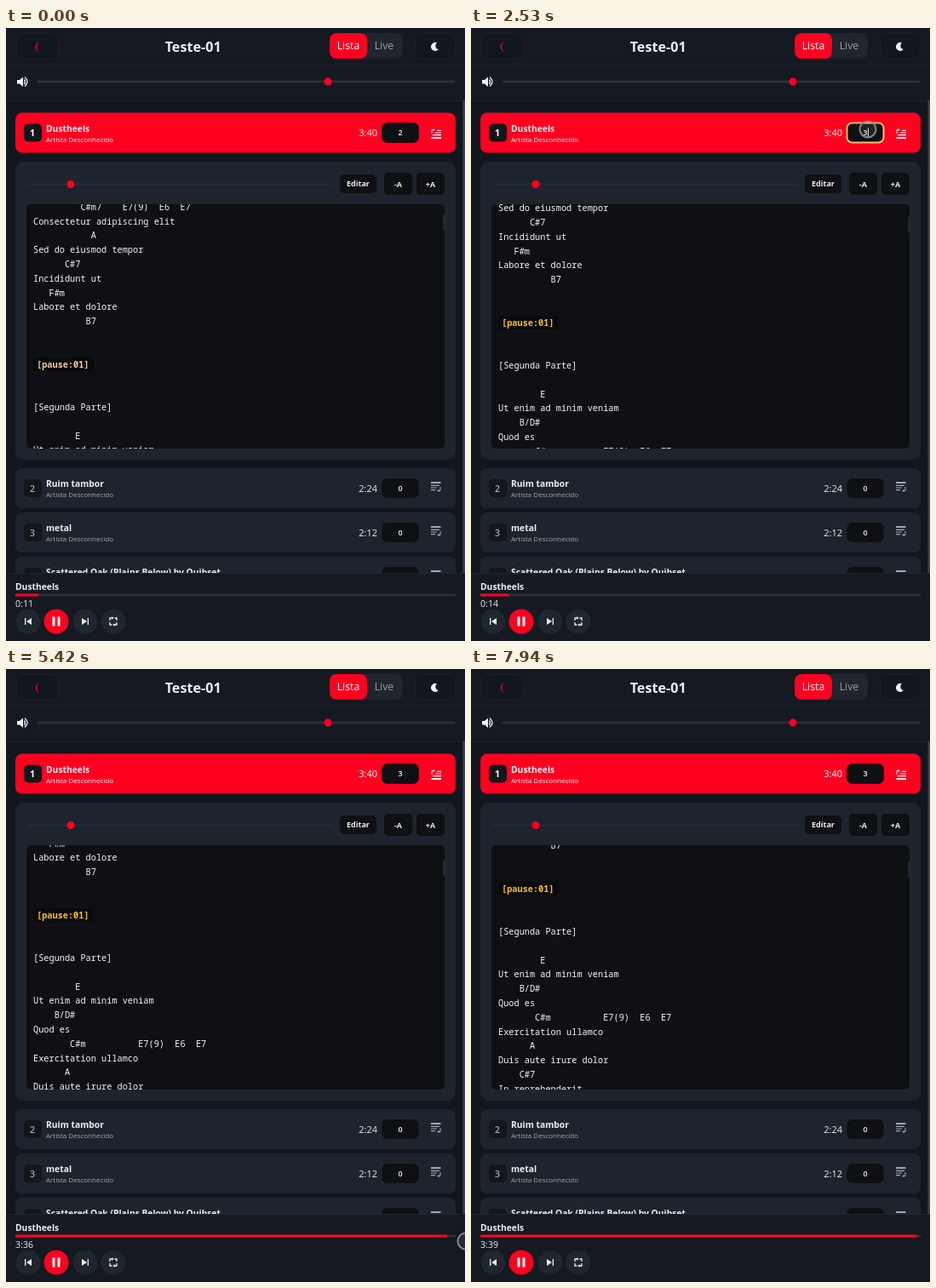
An HTML page that plays this animation: 539x720 px, repeating every 8 s.

```html
<!DOCTYPE html>
<html lang="pt">
<head>
<meta charset="utf-8">
<title>Player</title>
<style>
  html, body { margin: 0; width: 100%; height: 100%; overflow: hidden; background: #12171f; }
  svg { display: block; width: 539px; height: 720px; }
  text { font: 500 11px "Open Sans", "Noto Sans", sans-serif; fill: #eceef1; }
  text.title { font-weight: 700; font-size: 10.3px; }
  text.artist { font-size: 8px; fill: #a3a8b0; }
  text.tag { font-weight: 600; font-size: 10.5px; fill: #a9adb4; }
  text.value { font-size: 9px; font-weight: 600; }
  text.button { font-size: 9px; font-weight: 700; }
  text.tab { font-size: 12.3px; }
  .mid { text-anchor: middle; }
  .end { text-anchor: end; }
  #chart text { font: 500 10.27px "Noto Sans Mono", "DejaVu Sans Mono", monospace; white-space: pre; fill: #f4f5f6; }
  #chart text.pause { font-weight: 700; }
  .card { fill: #1e242d; }
  .dark { fill: #0e1013; }
  .outline { fill: #12171f; stroke: #1b2029; }
</style>
</head>
<body>
<svg viewBox="0 0 539 720">
  <defs>
    <clipPath id="view"><rect x="24" y="207" width="491" height="287" rx="5"/></clipPath>
    <g id="queue" stroke="currentColor" fill="none" stroke-width="1.2">
      <path d="M-6 -5H5.5" stroke-width="2"/>
      <path d="M-6 -1.7H4M-6 1H1M-6 3.7H-1"/>
      <path d="M5 0V4.5H2M3.5 3L2 4.5L3.5 6" stroke-width="1"/>
    </g>
    <path id="skip" d="M-4 -4V4H-2.7V-4ZM4 -4V4L-2 0Z" fill="#eee"/>
  </defs>

  <rect width="539" height="85" fill="#141922"/>
  <path d="M0 42.5H539M0 85.5H539" stroke="#1c212a"/>
  <rect class="outline" x="12.5" y="6.5" width="49" height="30" rx="8"/>
  <path d="M38 16.5Q31.5 22 38 27.5Q33.5 22 38 16.5Z" fill="#f00820" stroke="#f00820" stroke-width=".5"/>
  <text class="mid" x="219.7" y="28" style="font-size:16.2px;font-weight:700">Teste-01</text>
  <rect x="380" y="6" width="86" height="30" rx="8" fill="#20252e"/>
  <rect x="380" y="6" width="44" height="30" rx="8" fill="#ff0020"/>
  <text class="tab mid" x="402" y="24.5" style="fill:#fff">Lista</text>
  <text class="tab mid" x="444" y="24.5" style="fill:#9a9fa7">Live</text>
  <rect class="outline" x="480.5" y="6.5" width="47" height="30" rx="8"/>
  <path d="M506 17.2A5 5 0 1 0 507.8 25.2A4.5 4.5 0 0 1 506 17.2Z" fill="#f2f2f2"/>

  <path d="M13 61H16L20 57.5V69L16 65.5H13Z" fill="#f2f2f2"/>
  <path d="M21.5 60.5Q23.5 63 21.5 66M22 57.8Q28 63 22 68.5" fill="none" stroke="#f2f2f2" stroke-width="1.3"/>
  <path d="M38 63H526" stroke="#2a2f38" stroke-width="3" stroke-linecap="round"/>
  <circle cx="378" cy="63" r="4.5" fill="#ff0020"/>

  <g id="songs"></g>

  <rect class="card" x="11" y="157" width="517" height="350" rx="10"/>
  <path d="M26 183.5H384" stroke="#272d36" stroke-width="2"/>
  <circle cx="76" cy="183.5" r="4.5" fill="#ff0020"/>
  <rect class="dark" x="392" y="172" width="43" height="22" rx="5"/>
  <rect class="dark" x="444" y="170" width="33" height="26" rx="5"/>
  <rect class="dark" x="482" y="170" width="33" height="26" rx="5"/>
  <text class="button mid" x="413.5" y="186.3">Editar</text>
  <text class="button mid" x="460.5" y="186.5">-A</text>
  <text class="button mid" x="498.5" y="186.5">+A</text>
  <rect class="dark" x="24" y="207" width="491" height="287" rx="5"/>
  <g clip-path="url(#view)"><g id="chart"></g></g>
  <rect id="thumb" x="513" y="219" width="4" height="18" fill="#222831"/>
  <rect x="536.5" y="85" width="2.5" height="555" fill="#3d4147"/>

  <rect y="640" width="539" height="80" fill="#141922"/>
  <path d="M0 640.5H539" stroke="#20252e"/>
  <text class="title" x="11" y="660">Dustheels</text>
  <path d="M11 666H528" stroke="#2a2f37" stroke-width="3"/>
  <rect id="progress" x="11" y="664.5" height="3" fill="#ff0020"/>
  <text id="clock" x="11" y="680" style="font-size:10.6px"></text>
  <g fill="#20262e">
    <circle cx="26" cy="697" r="14.5"/><circle cx="93" cy="697" r="14.5"/><circle cx="126" cy="697" r="14.5"/>
    <circle cx="59" cy="697" r="14.5" fill="#ff0020"/>
  </g>
  <use href="#skip" x="26" y="697"/>
  <use href="#skip" transform="translate(93 697) scale(-1 1)"/>
  <path d="M54.5 691.5H57.5V702.5H54.5ZM60.5 691.5H63.5V702.5H60.5Z" fill="#fff"/>
  <path d="M122 696V693H125M130 698V701H127M127.5 693H130V696M124.5 701H122V698" fill="none" stroke="#eee" stroke-width="1.3"/>
  <path d="M124.5 691L126.5 693L124.5 695ZM127.5 699L125.5 701L127.5 703Z" fill="#eee"/>

  <circle id="cursor" r="9.5" fill="#fff" fill-opacity=".08" stroke="#85888c" stroke-width="2"/>
</svg>
<script>
const LOOP = 8000, LINE = 16.8, DURATION = 220.9;
const FOCUS = 1300, TYPED = 2100, SEEK = 4600, BLINK = 530;
const SCROLL_RATE = 0.0197, PAUSE_START = 6000, PAUSE_LENGTH = 950;
const $ = id => document.getElementById(id);

const songs = [
  { y: 99.5, title: 'Dustheels', time: '3:40', active: true },
  { y: 517, title: 'Ruim tambor', time: '2:24' },
  { y: 569, title: 'metal', time: '2:12' },
  { y: 621, title: 'Scattered Oak (Plains Below) by Quibset', time: '3:05' },
];
$('songs').innerHTML = songs.map(({ y, title, time, active }, i) => `
  <g transform="translate(0 ${y})">
    <rect class="card" x="11" width="517" height="47" rx="8" ${active ? 'style="fill:#ff0020"' : ''}/>
    <rect x="21" y="13" width="21" height="21" rx="5" fill="#13161b"/>
    <text class="tag mid" x="31" y="27.5" ${active ? 'style="fill:#fff;font-weight:700"' : ''}>${i + 1}</text>
    <text class="title" x="47" y="22.3">${title}</text>
    <text class="artist" x="47" y="34" ${active ? 'style="fill:#fff"' : ''}>Artista Desconhecido</text>
    <text class="end" x="436" y="27.8" ${active ? 'style="fill:#fff"' : ''}>${time}</text>
    <rect class="dark" x="441.5" y="12" width="43" height="23" rx="6" ${active ? 'id="field"' : ''}/>
    <text class="value mid" x="463" y="26.9" ${active ? 'id="count"' : ''}>0</text>
    ${active ? '<path id="caret" d="M466.5 18V29" stroke="#ddd"/>' : ''}
    <use href="#queue" color="${active ? '#fff' : '#a3a8b0'}"
      transform="translate(505 ${active ? 24.5 : 22}) rotate(${active ? 180 : 0})"/>
  </g>`).join('');

// Rows are counted from the pause marker.
const chart = {
  '-11': '         C#m7    E7(9)  E6  E7',
  '-10': 'Consectetur adipiscing elit',
  '-9': '           A',
  '-8': 'Sed do eiusmod tempor',
  '-7': '      C#7',
  '-6': 'Incididunt ut',
  '-5': '   F#m',
  '-4': 'Labore et dolore',
  '-3': '          B7',
  3: '[Segunda Parte]',
  5: '        E',
  6: 'Ut enim ad minim veniam',
  7: '    B/D#',
  8: 'Quod es',
  9: '       C#m          E7(9)  E6  E7',
  10: 'Exercitation ullamco',
  11: '      A',
  12: 'Duis aute irure dolor',
  13: '    C#7',
  14: 'In reprehenderit',
};
$('chart').innerHTML =
  `<rect x="32" y="387" width="71" height="16" rx="3" fill="#090a0c"/>
   <text id="marker" class="pause" x="36" y="398.6">[pause:01]</text>` +
  Object.entries(chart).map(([row, line]) =>
    `<text x="32" y="${398.6 + row * LINE}" xml:space="preserve">${line}</text>`).join('');

// time, x, y
const cursorPath = [
  [400, 555, 330], [850, 466, 119], [2750, 466, 119], [3400, 540, 702],
  [3700, 540, 702], [4350, 516, 668], [4700, 516, 668], [5100, 540, 672],
  [6100, 540, 672], [6250, 556, 676],
];

function cursorAt(t) {
  const next = cursorPath.findIndex(p => p[0] > t);
  if (next < 1) return cursorPath.at(next).slice(1);
  const [t0, x0, y0] = cursorPath[next - 1], [t1, x1, y1] = cursorPath[next];
  const u = (t - t0) / (t1 - t0), k = u * u * (3 - 2 * u);
  return [x0 + (x1 - x0) * k, y0 + (y1 - y0) * k];
}

function draw(t) {
  const held = Math.min(Math.max(t - PAUSE_START, 0), PAUSE_LENGTH);
  const scroll = Math.floor((t - held) * SCROLL_RATE);
  $('chart').setAttribute('transform', `translate(0 ${-scroll})`);
  $('thumb').setAttribute('y', 219 + scroll * 0.058);
  $('marker').style.fill = t < 100 ? '#f3cba4' : '#fcc021';

  const focused = t >= FOCUS && t < SEEK;
  const blinkStart = t < TYPED ? FOCUS : TYPED;
  $('field').style.stroke = focused ? '#f3bd6c' : '#3a0a12';
  $('field').style.strokeWidth = focused ? 2 : 1;
  $('count').textContent = t < TYPED ? 2 : 3;
  $('caret').style.display = focused && Math.floor((t - blinkStart) / BLINK) % 2 === 0 ? '' : 'none';

  const position = t < SEEK ? 11.8 + t / 1000 : 211.18 + t / 1000;
  const seconds = Math.floor(position);
  $('progress').setAttribute('width', 517 * position / DURATION);
  $('clock').textContent = `${Math.floor(seconds / 60)}:${String(seconds % 60).padStart(2, '0')}`;

  const [x, y] = cursorAt(t);
  $('cursor').setAttribute('cx', x);
  $('cursor').setAttribute('cy', y);
}

const start = performance.now();
function tick() {
  draw((performance.now() - start) % LOOP);
  requestAnimationFrame(tick);
}
tick();
</script>
</body>
</html>
```
